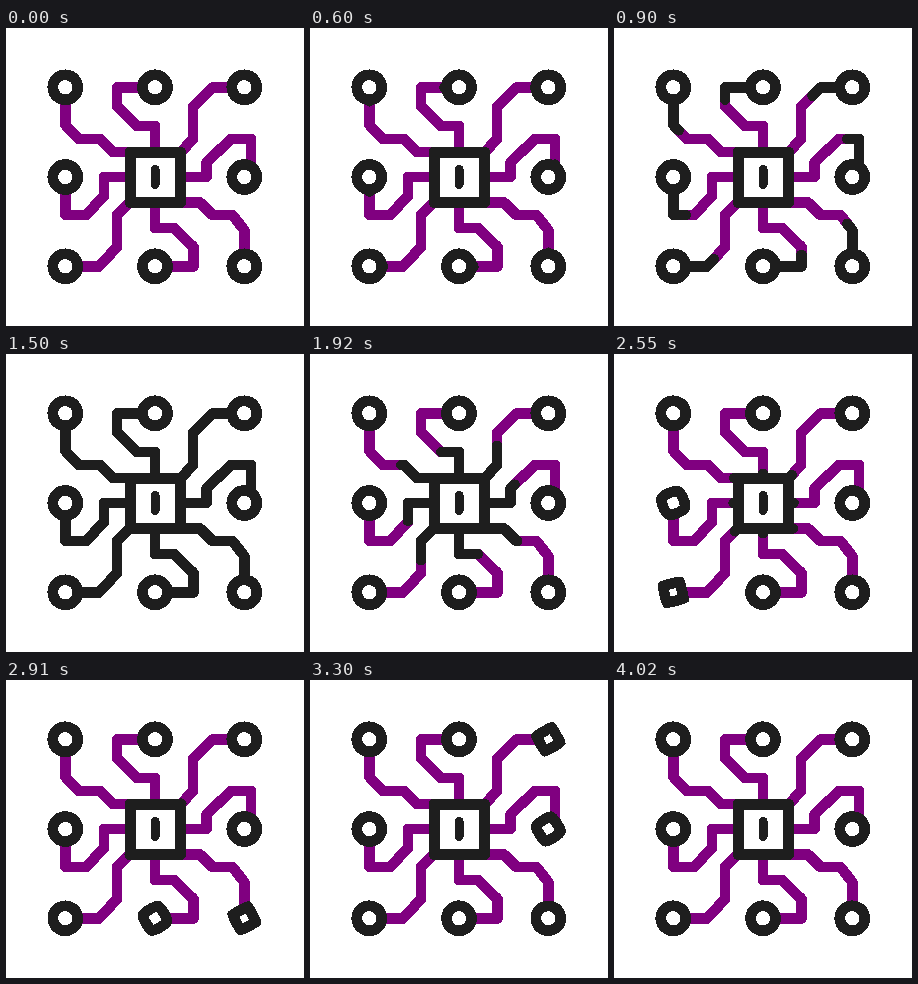
An HTML page that plays this animation: 298x298 px, repeating every 4.53 s.

```html
<!DOCTYPE html>
<html lang="en">
<head>
<meta charset="utf-8">
<title>Processor</title>
<style>
  html, body { margin: 0; width: 100%; height: 100%; overflow: hidden; background: #fff; }
  svg { display: block; width: 100%; height: 100%; shape-rendering: crispEdges; }
  path, rect { fill: none; stroke: #1e1e1e; stroke-width: 10.7; stroke-linejoin: round; }
  .wire { stroke: #800080; }
  .signal { stroke-linecap: round; }
</style>
</head>
<body>
<svg viewBox="0 0 298 298">
  <g id="wires"></g>
  <g id="signals"></g>
  <g id="nodes"></g>
  <rect x="124" y="124" width="50.5" height="50.5" style="stroke-width:11"/>
  <path d="M149.2 141.5V156.5" stroke-linecap="round" style="stroke-width:9"/>
</svg>
<script>
const LOOP = 4530;
const LOW = 59.3, MID = 149, HIGH = 238.3, RADIUS = 12.5;

// Counterclockwise from the top left; each wire runs from its node to the chip.
const parts = [
  { x: LOW, y: LOW, wire: 'M59.5 72V97L73 111H94L107 124H124.5' },
  { x: LOW, y: MID, wire: 'M59.5 162V187H80L98 168V149H124.5' },
  { x: LOW, y: HIGH, wire: 'M72 238.5H93L111 219V187L124 174.5' },
  { x: MID, y: HIGH, wire: 'M162 238.5H187.5V219L168 200H149V174.5' },
  { x: HIGH, y: HIGH, wire: 'M238.5 226V202.5L226.5 187H206.5L194 174.5H174.5' },
  { x: HIGH, y: MID, wire: 'M245 138V111H225L200.5 134.5V149H174.5' },
  { x: HIGH, y: LOW, wire: 'M226 59.5H207L187 79V111L175 124' },
  { x: MID, y: LOW, wire: 'M136 59.5H111V78L131 98H149V124.5' }
];

const HEAD = { start: 540, duration: 960 };
const TAIL = { start: 1500, duration: 1800 };
const MORPH = { start: 1920, stagger: 200, duration: 700, square: .3, round: .9 };
const TURN = { angle: 120, end: .82 };

const clamp = v => Math.min(1, Math.max(0, v));
const phase = (t, { start, duration }) => clamp((t - start) / duration);
const smooth = v => v * v * (3 - 2 * v);
const easeOut = v => 1 - (1 - v) ** 3.65;
const easeInOut = v => v < .5 ? 4 * v ** 3 : 1 - 4 * (1 - v) ** 3;

function addPath(groupId, className, d) {
  const path = document.createElementNS('http://www.w3.org/2000/svg', 'path');
  path.setAttribute('class', className);
  if (d) path.setAttribute('d', d);
  document.getElementById(groupId).append(path);
  return path;
}

// Four curves on a circle; zero roundness flattens them to a square.
function nodeShape(roundness) {
  const r = RADIUS, h = r * .5523 * roundness;
  return `M0 ${-r}C${h} ${-r} ${r} ${-h} ${r} 0S${h} ${r} 0 ${r}` +
    `S${-r} ${h} ${-r} 0S${-h} ${-r} 0 ${-r}Z`;
}

for (const part of parts) {
  addPath('wires', 'wire', part.wire);
  part.signal = addPath('signals', 'signal', part.wire);
  part.node = addPath('nodes', 'node');
  part.length = part.signal.getTotalLength();
}

function drawSignal({ signal, length }, head, tail) {
  const visible = head > 0 && tail < 1;
  signal.style.display = visible ? '' : 'none';
  signal.setAttribute('stroke-dasharray', `${Math.max(0, head - tail) * length} ${length * 2}`);
  signal.setAttribute('stroke-dashoffset', -tail * length);
}

function drawNode({ node, x, y }, progress) {
  const { square, round } = MORPH;
  const squareness = progress < square
    ? smooth(progress / square)
    : 1 - smooth(clamp((progress - square) / (round - square)));
  const angle = TURN.angle * easeInOut(clamp(progress / TURN.end));
  node.setAttribute('d', nodeShape(1 - squareness));
  node.setAttribute('transform', `translate(${x} ${y}) rotate(${angle})`);
}

function render(t) {
  const head = smooth(phase(t, HEAD));
  const tail = easeOut(phase(t, TAIL));
  parts.forEach((part, i) => {
    drawSignal(part, head, tail);
    drawNode(part, phase(t - i * MORPH.stagger, MORPH));
  });
}

const begin = performance.now();
function tick() {
  render((performance.now() - begin) % LOOP);
  requestAnimationFrame(tick);
}
tick();
</script>
</body>
</html>
```
